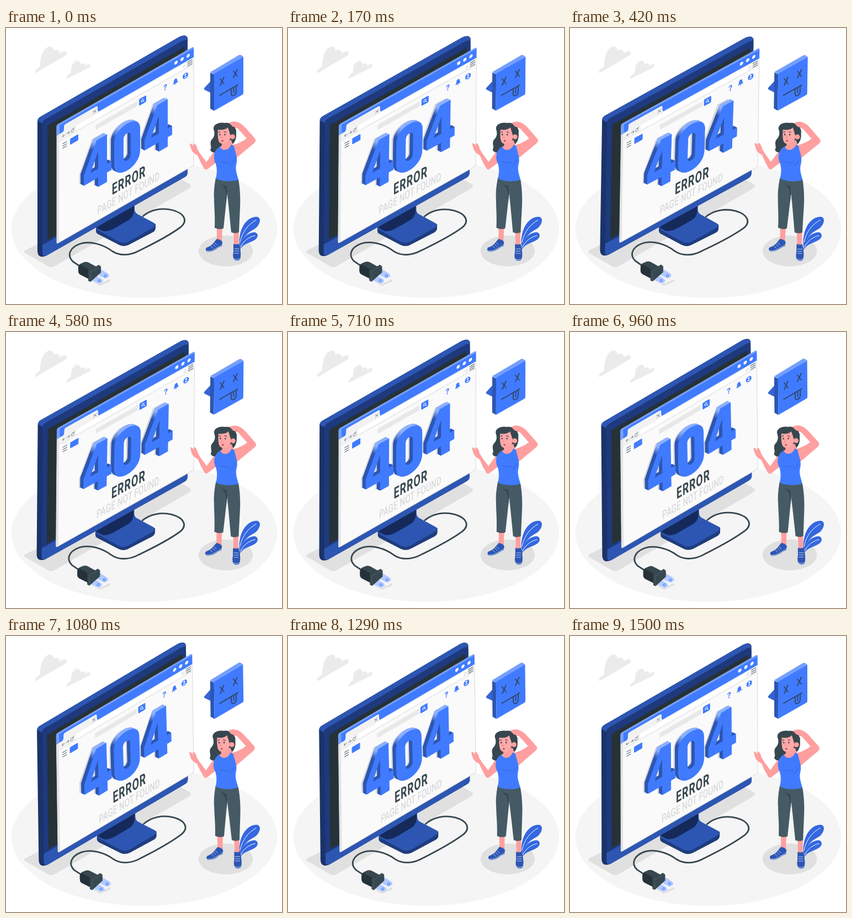
An HTML page for the animation above (1.54 s loop, 500x500 px).

```html
<!DOCTYPE html>
<html lang="en">
<head>
<meta charset="utf-8">
<title>404</title>
<style>
  html, body { margin: 0; width: 100%; height: 100%; overflow: hidden; background: #fff; }
  svg { display: block; width: 100%; height: 100%; }
  text { font-family: Roboto, "Liberation Sans", sans-serif; }
  .line { fill: none; stroke-linecap: round; stroke-linejoin: round; }
</style>
</head>
<body>
<svg viewBox="0 0 500 500">
  <defs>
    <linearGradient id="depth" x1="0" y1="64" x2="0" y2="84" gradientUnits="userSpaceOnUse">
      <stop offset=".45" stop-color="#8cb0ff"/><stop offset="1" stop-color="#2d56b3"/>
    </linearGradient>
    <path id="four" d="M72 69H91V122H99V138H91V155H75V138H49V120ZM75 122V90L61 122Z"/>
    <path id="zero" d="M104 92C104 63 151 63 151 92V132C151 163 104 163 104 132ZM121 95V130C121 139 134 139 134 130V95C134 85 121 85 121 95Z"/>
    <g id="digits" fill-rule="evenodd">
      <use href="#four"/><use href="#zero"/><use href="#four" x="110" y="-1"/>
    </g>
  </defs>

  <!-- floor, shadows, clouds, plant -->
  <ellipse cx="250.5" cy="364" rx="240.5" ry="125" fill="#f5f5f5"/>
  <g fill="#e0e0e0">
    <path d="M34 403L310 270L333 283Q338 287 331 291L89 431Q82 435 75 431L37 409Q31 406 34 403Z"/>
    <path d="M150 455L172 463L188 455L189 459L170 467Z"/>
    <ellipse cx="398" cy="404" rx="49" ry="28"/>
  </g>
  <g fill="#ebebeb">
    <path d="M53 82C52 79 53 76 55 75L62 69C62 56 65 40 75 35C82 31 86 36 86 42C91 36 97 40 98 46C101 43 104 42 106 42C110 42 111 46 109 49Z"/>
    <path d="M110 92Q109 88 112 85L118 80C117 71 120 63 127 60C133 58 135 63 135 67C139 62 143 64 144 69C149 64 153 64 153 68Q153 70 150 72Z"/>
  </g>
  <g fill="#3468e0">
    <path d="M423 397C420 362 437 341 455 342C463 344 461 355 452 363C440 370 432 373 423 397Z"/>
    <path d="M423 402C425 384 435 371 450 370C458 371 457 379 452 383C442 390 432 389 423 402Z"/>
    <path class="line" d="M424 388C428 368 440 355 453 348M425 397C430 386 439 379 451 376" stroke="#fff"/>
  </g>

  <g id="device">
    <!-- stand -->
    <path d="M163 362V368Q163 371 166 373L205 393Q213 397 222 393L266 370Q271 367 271 362V355L238 340L180 350Z" fill="#1f3c7d"/>
    <path d="M166 358Q161 362 166 366L205 387Q213 391 222 387L266 362Q273 358 268 353L238 337Q233 334 233 328V316L180 346Z" fill="#2d56b3"/>
    <path d="M164 362L180 346L232 318V331Q231 343 222 348L196 363Q186 369 176 368Z" fill="#152a5a"/>
    <!-- cable and plug -->
    <path class="line" d="M248 341C262 329 282 325 302 330C324 336 330 350 316 361C290 380 262 393 242 403C224 413 205 413 192 404C176 392 152 385 134 391C115 398 110 412 121 423L136 433" stroke="#37474f" stroke-width="2.8"/>
    <g fill="#b3caff" stroke="#d6e2ff" stroke-width=".7">
      <path d="M163 441L172 437L185 445Q188 448 186 451L180 454L163 446Z"/>
      <path d="M152 451L161 447L174 455Q177 458 175 461L169 463L153 456Z"/>
    </g>
    <path d="M131 434Q131 429 135 427L142 424Q146 423 150 425L163 432L168 429L172 432V443L153 460L149 458V454L135 447Q131 445 131 440Z" fill="#37474f"/>
    <path d="M131 434Q131 429 135 429L149 437V454L135 447Q131 445 131 440Z" fill="#263238"/>
    <path class="line" d="M153 441V459M153 441L171 432" stroke="#55666e" stroke-width=".8"/>
    <g fill="none" stroke="#407bff"><circle cx="180" cy="449" r="2"/><circle cx="169" cy="458" r="2"/></g>

    <!-- monitor -->
    <path d="M57 170Q57 164 62 161L314 16Q326 10 329 18V262Q329 267 324 270L72 413Q58 418 57 405Z" fill="#1b3369"/>
    <path d="M57 168Q58 163 62 161L314 16Q326 10 329 20L70 169L66 173Z" fill="#2d56b3"/>
    <path d="M66 173Q66 169 70 166L320 23Q329 19 329 27V258Q329 263 325 265L74 409Q66 412 66 404Z" fill="#1e3a7d"/>
    <path d="M66 393L329 245V262Q329 267 324 270L74 412Q66 415 66 408Z" fill="#2d56b3"/>
    <path d="M75 177L323 34V247L75 384Z" fill="#263238"/>

    <!-- browser window -->
    <g transform="matrix(1 -.573 0 1 92 176)">
      <rect width="248" height="215" rx="3" fill="#fafafa" stroke="#d8d8d8"/>
      <path d="M0 19H4V214L0 211Z" fill="#e3e3e3"/>
      <path d="M0 19V3Q0 0 3 0H245Q248 0 248 3V19Z" fill="#407bff"/>
      <path d="M0 3Q0 0 3 0H245Q248 0 248 3H5V19H0Z" fill="#759fff"/>
      <path d="M9 20Q13 19 13 14V10Q13 7 16 7H71Q74 7 74 10V14Q74 19 78 20Z" fill="#f2f2f2"/>
      <rect x="4" y="19" width="244" height="13" fill="#f2f2f2"/>
      <rect x="35" y="21" width="200" height="9" rx="2" fill="#fff"/>
      <path d="M4 32H248" stroke="#dedede" stroke-width=".8"/>
      <g fill="#fff"><circle cx="216" cy="10.500" r="3"/><circle cx="227" cy="10.500" r="3"/><circle cx="238" cy="10.500" r="3"/></g>
      <g class="line" stroke="#7b858a" stroke-width=".9">
        <path d="M66 12L71 17M71 12L66 17M10 26H15M12 24L10 26L12 28M18 26H23M21 24L23 26L21 28M30 24A2.600 2.600 0 1 0 31 26.500M31 22V24.500H28.500"/>
        <path d="M237 22H245M237 25.500H245M237 29H245M11 40H18M11 44H18M11 48H18" stroke="#546e7a" stroke-width="1.300"/>
        <circle cx="231" cy="26" r="2.200" stroke="#ccc"/>
      </g>
      <rect x="70" y="40" width="76" height="9" fill="#e8e8e8"/>
      <g fill="#407bff">
        <rect x="24" y="38.500" width="15" height="11" rx="1.500"/>
        <rect x="149" y="38.500" width="13" height="12" rx="1.500"/>
        <path d="M210 47.500Q212 46 212 43Q212 39 215 39Q218 39 218 43Q218 46 220 47.500ZM213.500 48.500H216.500L215 50Z"/>
        <circle cx="233" cy="44" r="5"/>
        <text x="193" y="49" font-size="14" font-weight="700">?</text>
      </g>
      <g fill="#fff"><circle cx="233" cy="42" r="1.700"/><path d="M230 47Q233 43 236 47Z"/></g>
      <path class="line" d="M156.500 45.500L158.500 47.500M157 44A2 2 0 1 0 153 44A2 2 0 1 0 157 44" stroke="#fff"/>
      <use href="#digits" x="-8.500" y="-7" fill="#d6d6d6"/>
    </g>

    <!-- message, swinging on top of the window -->
    <g id="message">
      <g transform="matrix(1 -.573 0 1 92 176)">
        <g id="extrusion" fill="url(#depth)"></g>
        <use href="#digits" fill="#407bff"/>
        <g transform="scale(.64 1)">
          <text x="156" y="184" font-size="28" font-weight="700" letter-spacing="1.500" fill="#37474f">ERROR</text>
          <text x="115" y="205" font-size="21" font-weight="500" letter-spacing=".35" fill="#dadada">PAGE NOT FOUND</text>
        </g>
      </g>
    </g>
  </g>

  <g id="bubble">
    <path d="M370 97L359 109Q358 111 360 112L370 117L378 104Z" fill="#3565d4"/>
    <path d="M370 81L377 84V150L370 146Z" fill="#2d56b3"/>
    <path d="M370 80L422 49Q424 48 426 49L430 52L377 84Z" fill="#759fff"/>
    <path d="M377 83L430 52V118Q430 120 428 121L377 150Z" fill="#407bff"/>
    <path class="line" d="M388 92L395 101M395 89L388 104M412 78L419 87M419 75L412 90M387 122L420 103M408 111V119Q408 124 413 122Q417 120 417 114V106M412.500 109V117" stroke="#2f4468" stroke-width="1.800"/>
  </g>

  <g id="woman">
    <g fill="#ff9f9f">
      <path d="M382 358H392L391 388Q386 391 382 386ZM412 365H422L421 393Q416 396 413 392Z"/>
      <path d="M404 172Q412 167 421 171Q428 174 434 181L450 199Q455 204 449 209L418 235L410 212Q424 209 436 200L420 182Q410 180 404 172Z"/>
      <path d="M381 215L388 238L366 255Q361 259 358 253Q352 243 347 231Q337 226 335 218L333 210Q336 208 339 213L341 217Q338 209 341 209Q345 211 347 220L352 228L363 243L376 225Q377 218 381 215Z"/>
    </g>
    <path d="M376 183C375 174 387 170 396 172C406 170 414 177 417 185V197C415 211 406 215 396 214L388 217C382 227 374 228 370 221C374 216 368 210 372 203C378 197 379 191 376 183Z" fill="#37474f"/>
    <path d="M391 203H408L412 214Q400 228 385 217L391 213Z" fill="#ff9f9f"/>
    <path d="M384 184Q396 186 402 180L407 196Q406 206 397 209Q388 212 385 204Q383 196 384 184Z" fill="#ffa9a9"/>
    <circle cx="410.500" cy="197" r="4.500" fill="#ff9f9f"/>
    <path d="M404 172Q410 169 416 174Q417 179 411 179Z" fill="#ff9f9f"/>
    <g fill="#263238"><ellipse cx="387.500" cy="193" rx="1.100" ry="1.600"/><ellipse cx="396.500" cy="193" rx="1.100" ry="1.600"/></g>
    <path class="line" d="M385 189L388 188M395 188L399 189" stroke="#263238"/>
    <path class="line" d="M391 194L389.500 199L391.500 200" stroke="#e97c7c" stroke-width=".8"/>
    <ellipse cx="392" cy="204.500" rx="2" ry="1.300" fill="#b94242"/>
    <path d="M380 271Q400 280 421 274C424 290 425 310 424 325L422 370Q415 373 408 370L404 330L401 297L398 325L394 363Q386 366 378 362C379 340 377 325 377 310C376 295 378 283 380 271Z" fill="#455a64"/>
    <path d="M385 278Q391 285 399 286L404 330L401 297L398 318Q400 298 396 290Z" fill="#37474f"/>
    <path d="M388 214C388 222 403 225 408 211L413 214C415 226 421 235 417 248C415 258 419 266 421 275Q400 281 380 273C383 262 382 252 380 246C374 235 377 224 383 218Z" fill="#407bff"/>
    <path class="line" d="M389 242Q397 246 405 243M414 238Q411 246 406 249" stroke="#3464d2"/>
    <g fill="#2d56b3">
      <path d="M382 382Q391 384 392 388L391 395Q385 397 380 401Q372 406 364 405Q360 402 363 398Q372 395 377 388Z"/>
      <path d="M412 391Q417 393 422 391Q425 398 425 406Q426 416 423 420Q417 423 413 419Q410 414 412 406Z"/>
    </g>
    <path class="line" d="M363 404Q372 405 379 400L391 393M413 418Q418 421 423 418M375 392L379 396M378 389L382 393M371 395L375 399M414 400H422M414 404H422M414 408H422" stroke="#c9d8ff" stroke-width=".9"/>
  </g>
</svg>
<script>
  const LOOP = 1540;
  const pivots = { device: [198, 238], message: [218, 235], bubble: [395, 99], woman: [392, 296] };
  const byId = id => document.getElementById(id);

  // Stacked copies give the digits their thickness.
  byId("extrusion").innerHTML = Array.from({ length: 12 }, (_, i) =>
    `<use href="#digits" x="${(i - 12) / 2}" y="${(i - 12) * 0.53}"/>`).join("");

  // Triangle wave: 0 → 1° → -1° → 0
  function swing(phase) {
    if (phase < 0.25) return phase * 4;
    return phase < 0.75 ? 2 - phase * 4 : phase * 4 - 4;
  }

  function draw() {
    const angle = swing(performance.now() % LOOP / LOOP);
    for (const id in pivots)
      byId(id).setAttribute("transform", `rotate(${angle} ${pivots[id]})`);
    requestAnimationFrame(draw);
  }
  draw();
</script>
</body>
</html>
```
